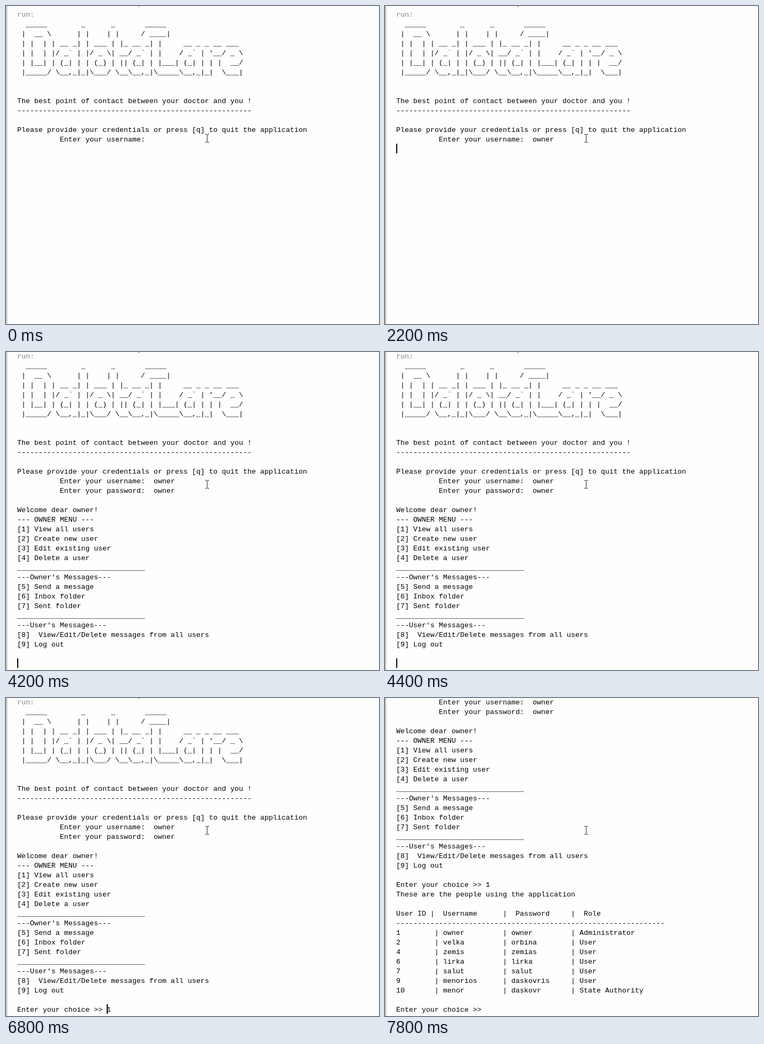
An HTML page that plays this animation: 700 px wide and 596 px high, repeating every 8 s.

```html
<!DOCTYPE html>
<html lang="en">
<head>
<meta charset="utf-8">
<title>Console session</title>
<style>
  html, body { margin: 0; width: 100%; height: 100%; overflow: hidden; background: #fefefd; }
  #stage { position: relative; width: 700px; height: 596px; overflow: hidden; }
  #stage > * { position: absolute; }
  #edge { left: 1px; top: 0; width: 1px; height: 596px; background: #8c8c8c; }
  #speck { left: 248px; top: 0; width: 3px; height: 1px; background: #777; }
  #view { left: 0; top: 0; }
  pre {
    position: absolute; left: 21px; top: 8px; margin: 0;
    font: 13.333px/18px "Liberation Mono", monospace;
    color: #000; white-space: pre;
  }
  pre::first-line { color: #808080; }
  #caret { position: absolute; width: 2px; height: 18px; background: #000; }
  #pointer { left: 373px; top: 240px; }
</style>
</head>
<body>
<div id="stage">
  <div id="edge"></div>
  <div id="speck"></div>
  <div id="view">
<pre id="log">run:
  _____        _      _       _____
 |  __ \      | |    | |     / ____|
 | |  | | __ _| | ___ | |_ __ _| |     __ _ _ __ ___
 | |  | |/ _` | |/ _ \| __/ _` | |    / _` | '__/ _ \
 | |__| | (_| | | (_) | || (_| | |___| (_| | | |  __/
 |_____/ \__,_|_|\___/ \__\__,_|\_____\__,_|_|  \___|


The best point of contact between your doctor and you !
-------------------------------------------------------

Please provide your credentials or press [q] to quit the application
          Enter your username:  owner
          Enter your password:  owner

Welcome dear owner!
--- OWNER MENU ---
[1] View all users
[2] Create new user
[3] Edit existing user
[4] Delete a user
______________________________
---Owner's Messages---
[5] Send a message
[6] Inbox folder
[7] Sent folder
______________________________
---User's Messages---
[8]  View/Edit/Delete messages from all users
[9] Log out

Enter your choice &gt;&gt; 1
These are the people using the application

User ID |  Username      |  Password     |  Role
---------------------------------------------------------------
1        | owner         | owner         | Administrator
2        | velka         | orbina        | User
4        | zemis         | zemias        | User
6        | lirka         | lirka         | User
7        | salut         | salut         | User
9        | menorios      | daskovris     | User
10       | menor         | daskovr       | State Authority

Enter your choice &gt;&gt; </pre>
    <div id="caret"></div>
  </div>
  <svg id="pointer" width="9" height="18" fill="none" stroke="#222" shape-rendering="crispEdges">
    <path d="M1 .5H4M5 .5H8M4.5 1V15M1 15.5H4M5 15.5H8"/>
  </svg>
</div>
<script>
const LOOP = 8000, TICK = 200, KEY = 180, BLINK = 500;
const ROW = 18, COL = 8, LEFT = 21, BOTTOM = 592;
const $ = id => document.getElementById(id);
const log = $("log"), caret = $("caret"), view = $("view"), speck = $("speck");
const lines = log.textContent.split("\n");

// Each prompt line waits for its output, asks, then takes keys until Enter.
const prompts = [
  { output: -900, ask: -900, type: 950 },
  { output: 2350, ask: 2350, type: 2450 },
  { output: 4150, ask: 4550, type: 6750 },
  { output: 7050, ask: 7250, type: Infinity }
];
lines.flatMap((line, row) => {
  const m = line.match(/^( *Enter .*(?::  |>> ))(.*)$/);
  return m ? { row, label: m[1], answer: m[2] } : [];
}).forEach((found, i) => Object.assign(prompts[i], found));

// Current row, its text, caret column and time of the last activity
function stateAt(t) {
  const { row, label, answer, output, ask, type } = prompts.findLast(p => p.output <= t);
  const enter = type + answer.length * KEY;
  if (t < ask) return { row, text: "", col: 0, since: output };
  if (t >= enter) return { row: row + 1, text: "", col: 0, since: enter };
  const keys = Math.max(0, Math.floor((t - type) / KEY) + 1);
  const since = keys ? type + (keys - 1) * KEY : ask;
  return { row, text: label + answer.slice(0, keys), col: label.length, since };
}

function show(t) {
  const { row, text, col, since } = stateAt(t);
  const top = 6 + row * ROW;
  const scroll = Math.max(0, top + ROW - BOTTOM);
  log.textContent = [...lines.slice(0, row), text].join("\n");
  view.style.top = -scroll + "px";
  caret.style.left = LEFT + col * COL + "px";
  caret.style.top = top + "px";
  caret.hidden = (t - since) % (2 * BLINK) >= BLINK;
  speck.hidden = scroll > ROW;
}

let last;
function frame() {
  const t = Math.floor(performance.now() % LOOP / TICK) * TICK;
  if (t !== last) show(last = t);
  requestAnimationFrame(frame);
}
frame();
</script>
</body>
</html>
```
